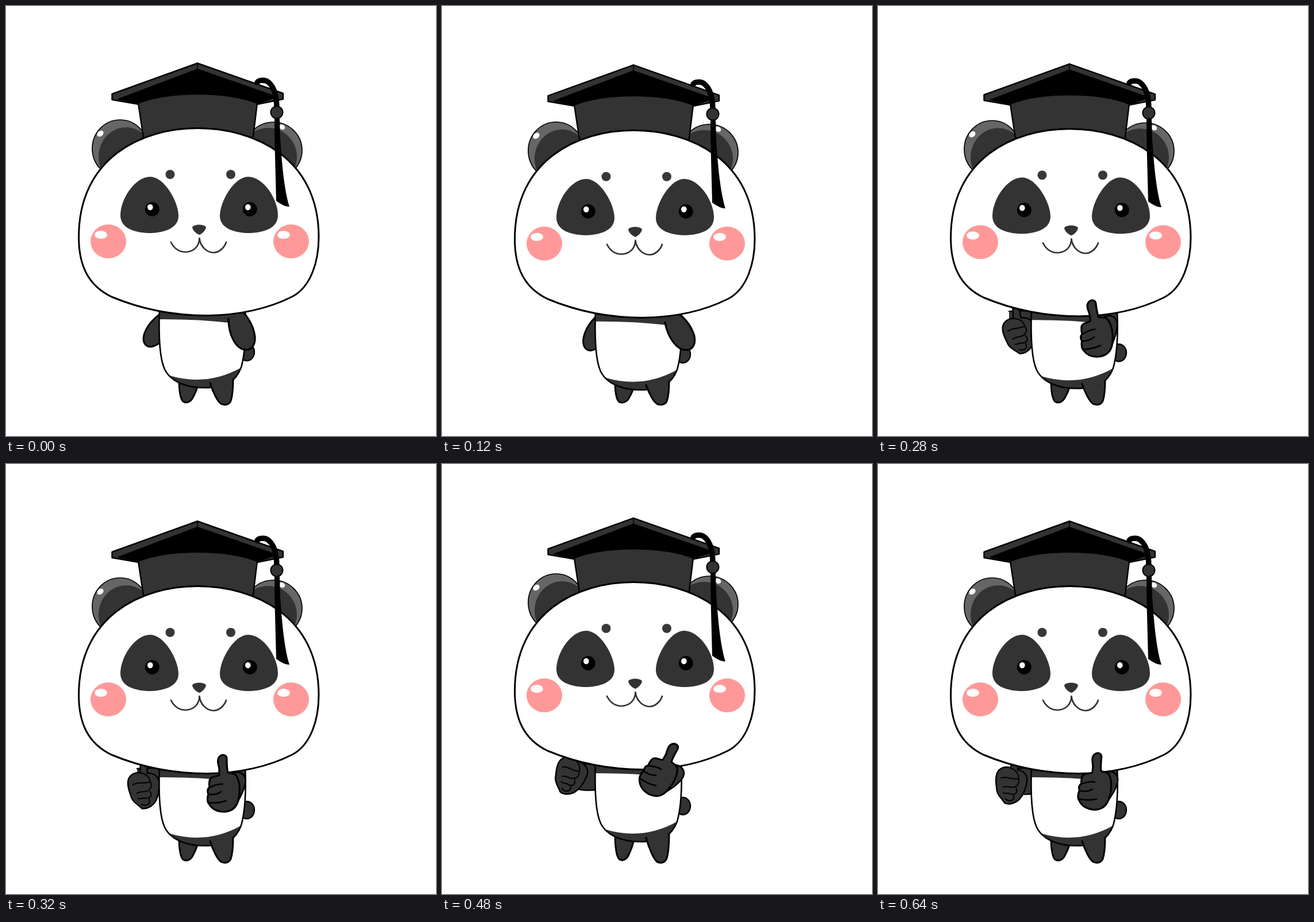
An HTML page with a canvas for the animation above (920 ms loop, 748 by 748 pixels).

```html
<!DOCTYPE html>
<html lang="en">
<head>
<meta charset="utf-8">
<title>Graduate panda</title>
<style>
  html, body { margin: 0; width: 100%; height: 100%; overflow: hidden; background: #fff; }
  canvas { display: block; width: 748px; height: 748px; }
</style>
</head>
<body>
<canvas id="stage" width="748" height="748"></canvas>
<script>
const ctx = document.getElementById('stage').getContext('2d');
const DARK = '#333', GREY = '#666', BLACK = '#000', WHITE = '#fff', PINK = '#ff9999';
const LOOP = 920, STEP = 40, LAST_POSE = 640;
const CENTER = 336;

const path = d => new Path2D(d);
const shapes = {
  head: path('M333 212.5C236 212.5 126.6 264 126.6 402C126.6 450 142 486 184 506C232 526 290 538.5 350 538.5C410 537.5 459 525 497 506C531 489 544 443 544 402C544 264 432 212.5 333 212.5Z'),
  body: path('M267 525C265 580 268 615 276 632C288 656 318 664 345 664C385 664 400 652 409 629C416 605 418 570 416 525Z'),
  shoulders: path('M260 520H425V551H388Q330 544 260 545Z'),
  hips: path('M285 643Q350 662 409 629L425 680H270Z'),
  legLeft: path('M301 648C301 668 303 683 308 688C314 692 321 688 324 683C328 676 331 670 333 662'),
  legRight: path('M355 656C360 672 368 688 374 692C380 695 388 694 391 687C395 675 395 660 395 650'),
  armLeft: path('M274 532C252 545 239 565 239 580C240 590 247 594 254 592.5C260 591 265 588 272 583'),
  armRight: path('M387 544C387 572 400 598 418 598C428 598 434 588 433 575C431 560 424 545 412 532'),
  sleeveLeft: path('M228 530L272 528V573Q254 577 228 571'),
  fistLeft: path('M233 537C221 536 212 543 212 555C212 566 216 572 218 580C222 590 230 592 236 599C243 601 252 597 258 590C265 580 267 566 266 552C264 541 254 537 246 538L245 520H234Z'),
  foldsLeft: path('M233 537C243 539 250 544 251 553M221 558C228 552 240 557 250 553M251 553C256 562 250 569 240 570C234 570 230 571 228 573M250 569C256 578 250 583 240 581C236 582 232 583 230 582M249 583C252 592 244 596 236 592'),
  sleeveRight: path('M396 537C408 534 416 540 416.5 550C416 565 408 578 403 588'),
  fistRight: path('M371 541C366 545 356 542 354 551C353 557 353 558 354 562C350 566 350 570 352 574C350 580 350 588 353 591C358 600 368 605 380 605C394 604 401 597 404 585C408 568 407 552 400 541C396 537 390 538 386 537C384 530 384 522 384 512C383 505 375 504 370 511C366 518 371 525 371 531Z'),
  foldsRight: path('M377 557C370 556 362 559 354 563M374 570C368 575 360 575 352 575M383 586C374 589 362 590 354 589'),
  patch: path('M251 297C275 297 300 340 300 365C300 388 272 395 248 395C222 394 199 386 199 364C199 336 224 297 251 297Z'),
  lids: path('M240 358C248 365 262 365 269 356.5M412 357.5C420 365 434 364 440 356.5'),
  nose: path('M324 385C326 379 346 379 348 385C347 391 340 397 336 398C331 396 325 391 324 385Z'),
  mouth: path('M287 411C293 423 303 428 313 428C327 427 336 418 336.5 404C338 419 350 429 361 429C371 429 380 420 383 411'),
  board: path('M333 99.5L482 152V162L437 171H231L184.5 163V153Z'),
  underside: path('M333 109L474 158L437 171H231L193 162Z'),
  crown: path('M230 169Q270 153 333 153Q397 153 437 169L429 235H240Z'),
  cord: path('M437 133C440 128 452 128 457 133C465 140 471 155 471 178'),
  tassel: path('M467 195H476L477 230C480 275 484 320 493 349Q483 349 470 339C469 290 467 240 467 195Z')
};

// Linear interpolation through [time, value] pairs
function track(keys, t) {
  for (let i = 1; i < keys.length; i++) {
    const [t0, a] = keys[i - 1], [t1, b] = keys[i];
    if (t <= t1) return a + (b - a) * (t - t0) / (t1 - t0);
  }
  return keys[keys.length - 1][1];
}
const bob = [[0, 0], [160, 5], [320, 0], [480, -7], [640, 0]];
const hatBob = [[0, 0], [180, 4.6], [320, 0], [480, -5.4], [640, 0]];
const swingLeft = [[0, 0], [120, -9], [200, -3], [280, 3]];
const swingRight = [[0, 0], [120, -10], [200, 6], [280, 20]];
const thumbLeft = [[280, -7], [320, 0], [400, 14], [480, 25], [640, 12]];
const thumbRight = [[280, -7], [320, 0], [400, 14], [480, 30], [640, 6]];

function draw(shape, fill, line = 0, color = BLACK) {
  if (fill) { ctx.fillStyle = fill; ctx.fill(shape); }
  if (line) { ctx.lineWidth = line; ctx.strokeStyle = color; ctx.stroke(shape); }
}
function oval(x, y, rx, ry = rx, tilt = 0) {
  const p = new Path2D();
  p.ellipse(x, y, rx, ry, tilt, 0, Math.PI * 2);
  return p;
}
function group(paint) { ctx.save(); paint(); ctx.restore(); }
function shifted(dx, dy, paint) {
  group(() => { ctx.translate(dx, dy); paint(); });
}
function turned(degrees, x, y, paint) {
  group(() => {
    ctx.translate(x, y);
    ctx.rotate(degrees * Math.PI / 180);
    ctx.translate(-x, -y);
    paint();
  });
}

function leg(shape, dy) {
  group(() => {
    ctx.translate(0, 694);
    ctx.scale(1, (44 - dy) / 44);
    ctx.translate(0, -694);
    draw(shape, DARK, 3);
  });
}

function ear(outer, inner, shine) {
  draw(outer, GREY);
  group(() => { ctx.clip(outer); draw(inner, DARK); });
  draw(outer, null, 1.7);
  draw(shine, WHITE);
}

function torso() {
  draw(shapes.body, WHITE);
  group(() => {
    ctx.clip(shapes.body);
    draw(shapes.shoulders, DARK);
    draw(shapes.hips, DARK);
  });
  draw(shapes.body, null, 2.6);
}

function hat() {
  draw(shapes.board, DARK, 2.4);
  draw(shapes.underside, BLACK);
  draw(path('M333 99V110'), null, 1.5);
  draw(shapes.crown, DARK, 2.4);
}

function tassel() {
  draw(shapes.cord, null, 9.5);
  draw(shapes.tassel, BLACK);
  draw(oval(471, 185, 10.5), DARK, 2);
}

function face(blink) {
  for (const x of [285.5, 391]) draw(oval(x, 293, 8), '#383838');
  draw(shapes.patch, DARK);
  group(() => {
    ctx.translate(CENTER * 2, 0);
    ctx.scale(-1, 1);
    draw(shapes.patch, DARK);
  });
  if (blink) draw(shapes.lids, null, 3);
  else for (const x of [254.3, 424.3]) {
    draw(oval(x, 353.5, 12.5), BLACK);
    draw(oval(x - 3.5, 350, 4.8, 5.2), WHITE);
  }
  for (const x of [178, 496]) {
    draw(oval(x, 409.5, 31, 29.5), PINK);
    draw(oval(x - 13, 398, 11, 7), WHITE);
  }
  draw(shapes.nose, DARK);
  draw(shapes.mouth, null, 2.7, DARK);
}

function leftArm(t, thumbs) {
  if (!thumbs) {
    turned(track(swingLeft, t), 272, 538, () => draw(shapes.armLeft, DARK, 3));
    return;
  }
  const angle = track(thumbLeft, t);
  draw(shapes.sleeveLeft, DARK, 2.4);
  shifted(-0.45 * angle, 0, () => turned(angle, 275, 545, () => {
    draw(shapes.fistLeft, DARK, 2.4);
    draw(shapes.foldsLeft, null, 2);
  }));
}

function thumbUp(t) {
  const angle = track(thumbRight, t);
  shifted(0.14 * angle, 0, () => turned(angle, 412, 548, () => {
    draw(shapes.sleeveRight, DARK, 2.6);
    draw(shapes.fistRight, DARK, 3.2);
    draw(shapes.foldsRight, null, 2.6);
  }));
}

function render(t) {
  const dy = track(bob, t);
  const thumbs = t >= 280;
  const blink = t >= 160 && t < 280;
  ctx.fillStyle = WHITE;
  ctx.fillRect(0, 0, 748, 748);

  shifted(0, dy, () => {
    leftArm(t, thumbs);
    draw(oval(419, 602, 13, 15), DARK, 2.4);
  });
  leg(shapes.legLeft, dy);
  shifted(0, dy, torso);
  leg(shapes.legRight, dy);
  shifted(0, dy, () => {
    if (!thumbs) turned(track(swingRight, t), 402, 540, () => draw(shapes.armRight, DARK, 3.2));
    ear(oval(198.5, 248, 48.5, 50), oval(209, 262, 48, 51), oval(164, 222, 6.2, 4.6, -0.7));
    ear(oval(465, 251, 50, 49), oval(456, 262, 50, 50), oval(480, 210.5, 5.5, 4.3, 0.5));
  });
  shifted(0, track(hatBob, t), hat);
  shifted(0, dy, () => {
    draw(shapes.head, WHITE, 3);
    face(blink);
  });
  shifted(0, dy * 0.8, tassel);
  if (thumbs) shifted(0, dy, () => thumbUp(t));
}

ctx.lineCap = ctx.lineJoin = 'round';
const start = performance.now();
function tick() {
  const t = (performance.now() - start) % LOOP;
  render(Math.min(Math.floor(t / STEP) * STEP, LAST_POSE));
  requestAnimationFrame(tick);
}
tick();
</script>
</body>
</html>
```
